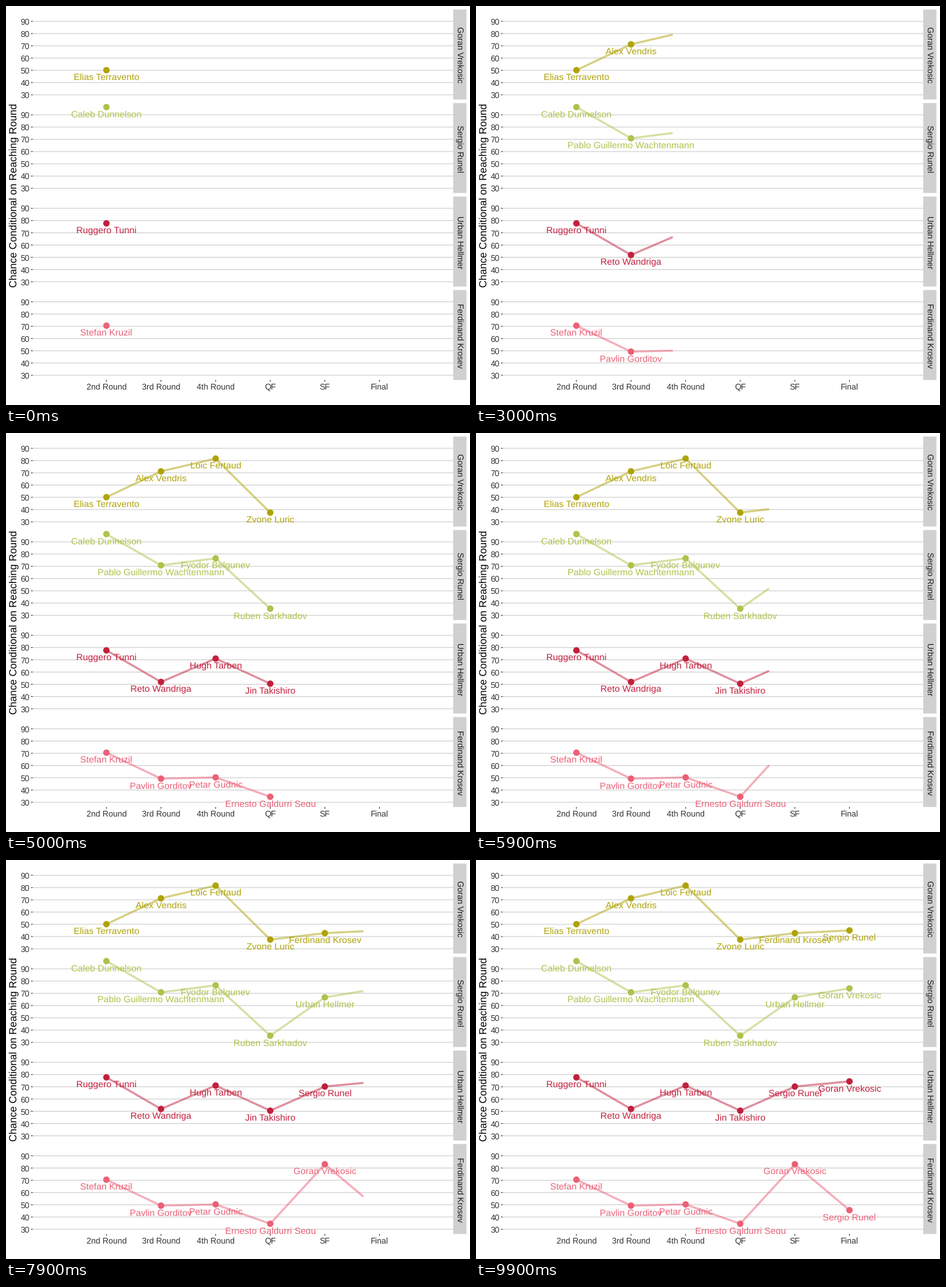
A matplotlib script for the animation above (10000 ms loop, 720 by 620 pixels).

```python
import numpy as np
import matplotlib.pyplot as plt
from matplotlib.animation import FuncAnimation
from matplotlib.patches import Circle, Rectangle

W, H, DPI = 720, 620, 100
FRAMES, STEP = 100, 100
PX = 72 / DPI  # one pixel in points

plt.rcParams.update({"font.family": "Liberation Sans", "text.hinting": "none",
                     "path.snap": False})

LEFT, RIGHT, STRIP_END = 41.5, 694, 714.5
TOP, PANEL_H, PITCH = 5.5, 139.8, 145.27
BOTTOM = TOP + 3 * PITCH + PANEL_H
TICK, HAIR = 2.74, 1.07
UNIT = 1.9033  # pixels per percentage point
ROUNDS = ["2nd Round", "3rd Round", "4th Round", "QF", "SF", "Final"]
XS = 155.8 + 84.74 * np.arange(6)
KEYS = np.array([0, 17, 34, 50, 67, 84])  # arrival at each round

A, B, C, D = "Goran Vrekosic", "Sergio Runel", "Urban Hellmer", "Ferdinand Krosev"
PLAYERS = [
    (A, "#AFA308", [50.1, 71.2, 81.6, 37.5, 42.8, 45.0],
     ["Elias Terravento", "Alex Vendris", "Loic Fertaud", "Zvone Luric", D, B]),
    (B, "#AEC24B", [96.3, 70.8, 76.5, 35.4, 66.7, 74.0],
     ["Caleb Dunnelson", "Pablo Guillermo Wachtenmann", "Fyodor Belgunev",
      "Ruben Sarkhadov", C, A]),
    (C, "#C1203D", [77.7, 51.9, 71.0, 50.5, 70.2, 74.4],
     ["Ruggero Tunni", "Reto Wandriga", "Hugh Tarben", "Jin Takishiro", B, A]),
    (D, "#EB6077", [70.5, 49.3, 50.3, 34.5, 83.1, 45.6],
     ["Stefan Kruzil", "Pavlin Gorditov", "Petar Gudnic",
      "Ernesto Galdurri Segu", A, B]),
]

fig = plt.figure(figsize=(W / DPI, H / DPI), dpi=DPI, facecolor="white")
ax = fig.add_axes([0, 0, 1, 1])
ax.set(xlim=(0, W), ylim=(H, 0))
ax.axis("off")


def text(x, y, s, size, color, ha="center", angle=0, **kw):
    return ax.text(x, y, s, fontsize=size * PX, color=color, ha=ha, va="baseline",
                   rotation=angle, rotation_mode="anchor", **kw)


def segment(x, y, color, width=HAIR, **kw):
    return ax.plot(x, y, color=color, lw=width * PX, solid_capstyle="butt",
                   solid_joinstyle="round", **kw)[0]


def build_panel(i, name, color, values, rivals):
    top = TOP + i * PITCH
    to_y = lambda v: top + 18.3 + (90 - np.asarray(v)) * UNIT
    clip = Rectangle((LEFT, top), RIGHT - LEFT, PANEL_H, transform=ax.transData)

    for v in range(30, 100, 10):
        y = to_y(v)
        segment([LEFT, RIGHT], [y, y], "#CCCCCC", zorder=1)
        segment([LEFT - TICK, LEFT], [y, y], "#333333", zorder=1)
        text(37, y + 5, v, 12.8, "#333333", ha="right")
    ax.add_patch(Rectangle((RIGHT, top), STRIP_END - RIGHT, PANEL_H, fc="#D0D0D0", lw=0))
    text(699.7, top + PANEL_H / 2 + 0.7, name, 12.8, "#1A1A1A", angle=-90)

    ys = to_y(values)
    trail = segment([], [], color, 3.2, alpha=0.5, zorder=3)
    stops = []
    for x, y, rival in zip(XS, ys, rivals):
        dot = ax.add_patch(Circle((x, y), 5, fc=color, lw=0, zorder=4))
        label = text(x, y + 15.5, rival, 14.2, color, zorder=5, clip_on=True)
        label.set_clip_path(clip)
        stops.append((dot, label))
    return ys, trail, stops


panels = [build_panel(i, *p) for i, p in enumerate(PLAYERS)]
for x, name in zip(XS, ROUNDS):
    segment([x, x], [BOTTOM, BOTTOM + TICK], "#333333")
    text(x, 596, name, 12.8, "#333333")
text(17, 294, "Chance Conditional on Reaching Round", 16, "black", angle=90)


def update(frame):
    done = KEYS <= frame
    for ys, trail, stops in panels:
        trail.set_data(np.append(XS[done], np.interp(frame, KEYS, XS)),
                       np.append(ys[done], np.interp(frame, KEYS, ys)))
        for shown, artists in zip(done, stops):
            for artist in artists:
                artist.set_visible(bool(shown))


anim = FuncAnimation(fig, update, frames=FRAMES, interval=STEP,
                     init_func=lambda: update(0), repeat=True, repeat_delay=0, blit=False)
plt.show()
```
